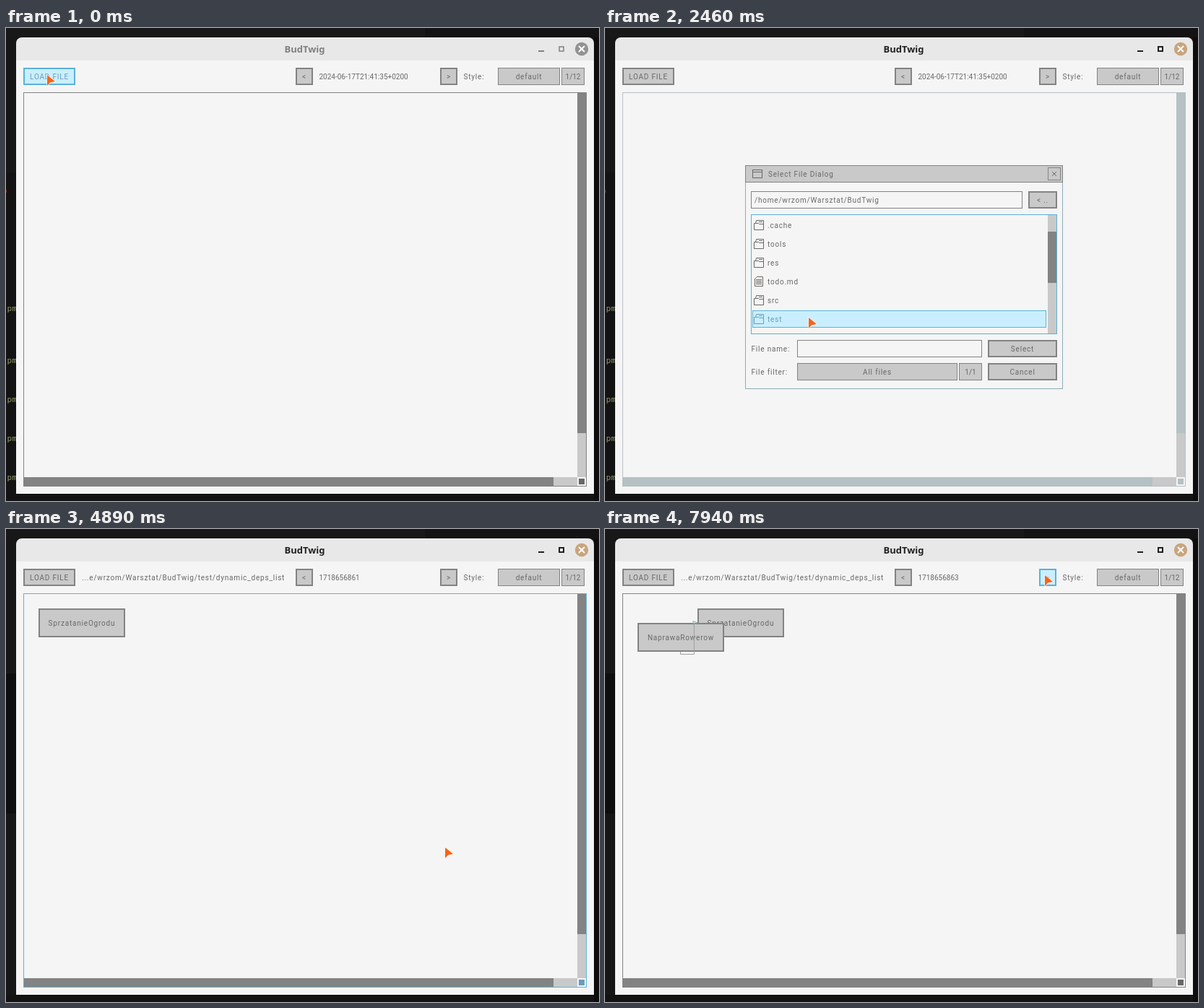
An HTML page with a canvas for the animation above (8 s loop, 821 by 655 pixels).

```html
<!DOCTYPE html>
<html lang="en">
<head>
<meta charset="utf-8">
<title>BudTwig</title>
<style>
  html, body { margin: 0; width: 100%; height: 100%; overflow: hidden; background: #141414; }
  canvas { display: block; }
</style>
</head>
<body>
<canvas id="stage" width="821" height="655"></canvas>
<script>
const ctx = document.getElementById('stage').getContext('2d');
const LOOP = 8000, OPEN = 370, CLOSE = 4890, ENTER = 2910, PICK = 3890;
const BG = '#f5f5f5', LINE = '#90abb5';
const STYLE = {
  normal:   { border: '#838383', base: '#c9c9c9', text: '#686868' },
  focused:  { border: '#5bb2d9', base: '#c9effe', text: '#6c9bbc' },
  pressed:  { border: '#0492c7', base: '#97e8ff', text: '#368baf' },
  disabled: { border: '#b5c1c2', base: '#c9c9c9', text: '#aeb7b8' },
};
const HOME = '/home/wrzom/Warsztat/BudTwig';
const FOLDERS = ['docs', 'build', '.cache', 'tools', 'res', 'todo.md', 'src', 'test'];
const FILES = ['dynamic_deps_list', 'sample_list'];

// Pointer positions as [time, x, y], each held until the next one.
const START = [57, 65], FIELD = [400, 238], STEPS = 9;
const pointer = [[0, ...START]];
for (let i = 1; i <= STEPS; i++) {
  const k = i / STEPS, ease = k * k * (3 - 2 * k);
  pointer.push([630 + 230 * (i - 1) / (STEPS - 1), ...START.map((a, j) => a + (FIELD[j] - a) * ease)]);
}
pointer.push(
  [1260, 386, 355], [2060, 340, 378], [2170, 283, 400], [2460, 282, 401],
  [3170, 300, 350], [3290, 343, 290], [3430, 345, 265], [3570, 344, 267], [3890, 336, 269], [4000, 340, 275],
  [4230, 420, 340], [4320, 510, 420], [4420, 590, 484], [4510, 608, 441],
  [5170, 563, 475], [5400, 560, 300], [5510, 548, 108],
  [5660, 562, 80], [5770, 590, 70], [5890, 605, 66], [6000, 609, 64]);

// [time, highlighted list row]
const rows = [[0, -1], [1260, 3], [1570, 2], [1800, 3], [2060, 4], [2170, 5], [2910, -1], [3290, 1], [3430, 0]];
const scrolls = [[0, 0], [1260, 1], [1570, 2]];
const stamps = [[0, '2024-06-17T21:41:35+0200'], [CLOSE, '1718656861'], [7170, '1718656862'], [7630, '1718656863']];
// [time, x of the upper node, y of the lower node]
const layout = [[7170, 45, 160], [7630, 56, 156], [7770, 85, 145], [7940, 128, 130]];

const at = (keys, t) => keys.findLast(k => k[0] <= t);
let mouse = START;
const over = (x, y, w, h) => mouse[0] >= x && mouse[0] < x + w && mouse[1] >= y && mouse[1] < y + h;

function rect(x, y, w, h, color) {
  ctx.fillStyle = color;
  ctx.fillRect(x, y, w, h);
}

function frame(x, y, w, h, border, base, width = 1) {
  rect(x, y, w, h, border);
  rect(x + width, y + width, w - 2 * width, h - 2 * width, base);
}

function path(color, width, ...points) {
  ctx.strokeStyle = color;
  ctx.lineWidth = width;
  ctx.beginPath();
  for (let i = 0; i < points.length; i += 2) ctx.lineTo(points[i], points[i + 1]);
  ctx.stroke();
}

function label(text, x, y, color = STYLE.normal.text, align = 'left') {
  ctx.font = '10px Roboto, sans-serif';
  ctx.letterSpacing = /^[\dT\/:+-]+$/.test(text) ? '0px' : '0.8px';
  ctx.textAlign = align;
  ctx.fillStyle = color;
  ctx.fillText(text, x, y + 3.5);
}

function button(text, x, y, w, h = 24, state = over(x, y, w, h) ? 'focused' : 'normal', width = 2) {
  const s = STYLE[state];
  frame(x, y, w, h, s.border, s.base, width);
  label(text, x + w / 2, y + h / 2, s.text, 'center');
}

function field(text, x, y, w) {
  frame(x, y, w, 24, STYLE[over(x, y, w, 24) ? 'focused' : 'normal'].border, BG);
  label(text, x + 5, y + 12);
}

function combo(text, count, x, y, w) {
  button(text, x, y, w, 24, 'normal', 1);
  button(count, x + w + 2, y, 32, 24, 'normal', 1);
}

function drawDesktop(t) {
  rect(0, 0, 821, 655, '#131313');
  rect(0, 0, 821, 13, '#181818');
  rect(580, 0, 241, 13, '#131313');
  rect(0, 13, 14, 187, '#171717');
  rect(814, 13, 7, 642, '#0d0d0d');
  if (t < CLOSE) {
    ctx.font = '11px "DejaVu Sans Mono", monospace';
    ctx.letterSpacing = '0px';
    ctx.textAlign = 'left';
    ctx.fillStyle = '#8b9a68';
    for (const y of [388, 460, 514, 568, 622]) ctx.fillText('.pm', -5, y + 4);
    rect(0, 224, 1, 4, '#8a2020');
  } else {
    rect(0, 200, 14, 194, '#0e0e0e');
    rect(0, 394, 14, 251, '#161616');
  }
}

function drawWindow(t) {
  const active = t >= 260, ink = active ? '#202020' : '#808080';
  ctx.fillStyle = '#e8e8e8';
  ctx.beginPath();
  ctx.roundRect(14, 13, 800, 40, [8, 8, 0, 0]);
  ctx.fill();
  rect(14, 45, 800, 600, BG);
  ctx.font = 'bold 13px "Noto Sans", "Open Sans", sans-serif';
  ctx.letterSpacing = '0px';
  ctx.textAlign = 'center';
  ctx.fillStyle = ink;
  ctx.fillText('BudTwig', 413.5, 34);
  rect(737, 31, 8, 2, ink);
  ctx.strokeStyle = ink;
  ctx.lineWidth = active ? 2 : 1.5;
  ctx.strokeRect(766, 26, 6, 6);
  ctx.fillStyle = active ? '#c9a47c' : '#929292';
  ctx.beginPath();
  ctx.arc(797, 29, 9.2, 0, 7);
  ctx.fill();
  path('#fff', 2, 793, 25, 801, 33);
  path('#fff', 2, 801, 25, 793, 33);
}

function drawToolbar(t) {
  const loading = t >= 260 && t < OPEN, stepping = t >= 7060 && t < 7170;
  button('LOAD FILE', 24, 55, 72, 24, loading ? 'pressed' : undefined);
  if (t >= CLOSE) label('...e' + HOME.slice(5) + '/test/dynamic_deps_list', 105, 67);
  button('<', 401, 55, 24);
  label(at(stamps, t)[1], 433.5, 67);
  button('>', 601, 55, 24, 24, stepping ? 'pressed' : undefined);
  label('Style:', 633.5, 67);
  combo('default', '1/12', 681, 55, 86);
}

function drawPanel(t, modal) {
  const hot = !modal && over(24, 89, 780, 546);
  const bar = STYLE[modal ? 'disabled' : 'normal'].border;
  const edge = hot ? STYLE.focused.border : bar;
  frame(24, 89, 780, 546, edge, BG);
  rect(791, 90, 12, 532, '#c9c9c9');
  rect(791, 90, 12, 471, bar);
  rect(25, 622, 766, 12, '#c9c9c9');
  rect(25, 622, 733, 12, bar);
  rect(793, 624, 8, 8, modal ? bar : STYLE[hot ? 'focused' : 'normal'].text);
}

function drawNodes(t) {
  if (t < CLOSE) return;
  const [, x, y] = at(layout, t) || [0, 45];
  button('SprzatanieOgrodu', x, 110, 120, 40, 'normal');
  if (!y) return;
  button('NaprawaRowerow', 45, y, 120, 40, 'normal');
  if (t < 7630) return;
  const bend = x - 4.5;
  path('#a0a0a0', 1, 104.5, y + 40, 104.5, y + 43.5, bend, y + 43.5, bend, 130);
  path('#7fae9c', 1, x, 130, x - 6, 127.5, x - 6, 132.5, x, 130);
}

function folderIcon(x, y, color) {
  path(color, 1, x + 2.5, y + 4.5, x + .5, y + 4.5, x + .5, y + 13.5, x + 13.5, y + 13.5, x + 13.5, y + .5,
    x + 3.5, y + .5, x + 2.5, y + 4.5, x + 6.5, y + 4.5, x + 7.5, y + 5.5, x + 13, y + 5.5);
  path(color, 1, x + 7, y + 2.5, x + 12, y + 2.5);
}

function fileIcon(x, y, color, lined) {
  path(color, 1, x + 1.5, y + 3.5, x + 4.5, y + .5, x + 12.5, y + .5, x + 12.5, y + 13.5, x + 1.5, y + 13.5, x + 1.5, y + 3);
  if (lined) for (let i = 4.5; i < 12; i += 2) path(color, 1, x + 3, y + i, x + 11, y + i);
}

function drawList(t) {
  const inside = t >= ENTER, scroll = inside ? 0 : at(scrolls, t)[1];
  const items = inside ? FILES : FOLDERS.slice(scroll, scroll + 6);
  const active = at(rows, t)[1];
  frame(202, 258, 424, 166, STYLE[over(202, 258, 424, 166) ? 'focused' : 'normal'].border, BG);
  items.forEach((name, i) => {
    const y = 261 + 26 * i;
    const s = STYLE[i !== active ? 'normal' : t >= PICK ? 'pressed' : 'focused'];
    if (i === active) frame(204, y, inside ? 419 : 407, 24, s.border, s.base);
    if (inside || name.endsWith('.md')) fileIcon(206, y + 5, s.text, !inside);
    else folderIcon(206, y + 5, s.text);
    label(name, 225, y + 12, s.text);
  });
  if (inside) return;
  rect(613, 259, 12, 164, '#c9c9c9');
  rect(613, Math.round(259 + 11.7 * scroll), 12, 71, '#838383');
}

function drawDialog(t) {
  const ink = STYLE.normal.text;
  frame(194, 190, 440, 310, LINE, BG);
  frame(194, 190, 440, 24, '#838383', '#c9c9c9');
  ctx.strokeStyle = ink;
  ctx.lineWidth = 1;
  ctx.strokeRect(204.5, 196.5, 13, 11);
  path(ink, 1, 204, 199.5, 218, 199.5);
  label('Select File Dialog', 226, 202);
  button('', 613, 193, 18, 18, 'normal', 1);
  path(ink, 1, 619, 199, 625, 205);
  path(ink, 1, 625, 199, 619, 205);
  field(HOME + (t >= ENTER ? '/test' : ''), 202, 226, 376);
  button('< ..', 586, 226, 40);
  drawList(t);
  label('File name:', 202.5, 444);
  field(t >= PICK ? FILES[0] : '', 266, 432, 256);
  button('Select', 530, 432, 96);
  label('File filter:', 202.5, 476);
  combo('All files', '1/1', 266, 464, 222);
  button('Cancel', 530, 464, 96);
}

function drawPointer([x, y]) {
  ctx.beginPath();
  for (const [dx, dy] of [[0, 0], [11, 9], [4, 10.5], [0, 15]]) ctx.lineTo(x + dx, y + dy);
  ctx.closePath();
  ctx.strokeStyle = 'rgba(255,255,255,.8)';
  ctx.lineWidth = 1.5;
  ctx.stroke();
  ctx.fillStyle = '#f96416';
  ctx.fill();
}

function draw() {
  const t = performance.now() % LOOP;
  const modal = t >= OPEN && t < CLOSE;
  mouse = at(pointer, t).slice(1);
  drawDesktop(t);
  drawWindow(t);
  drawToolbar(t);
  drawPanel(t, modal);
  drawNodes(t);
  if (modal) drawDialog(t);
  drawPointer(mouse);
  requestAnimationFrame(draw);
}
draw();
</script>
</body>
</html>
```
